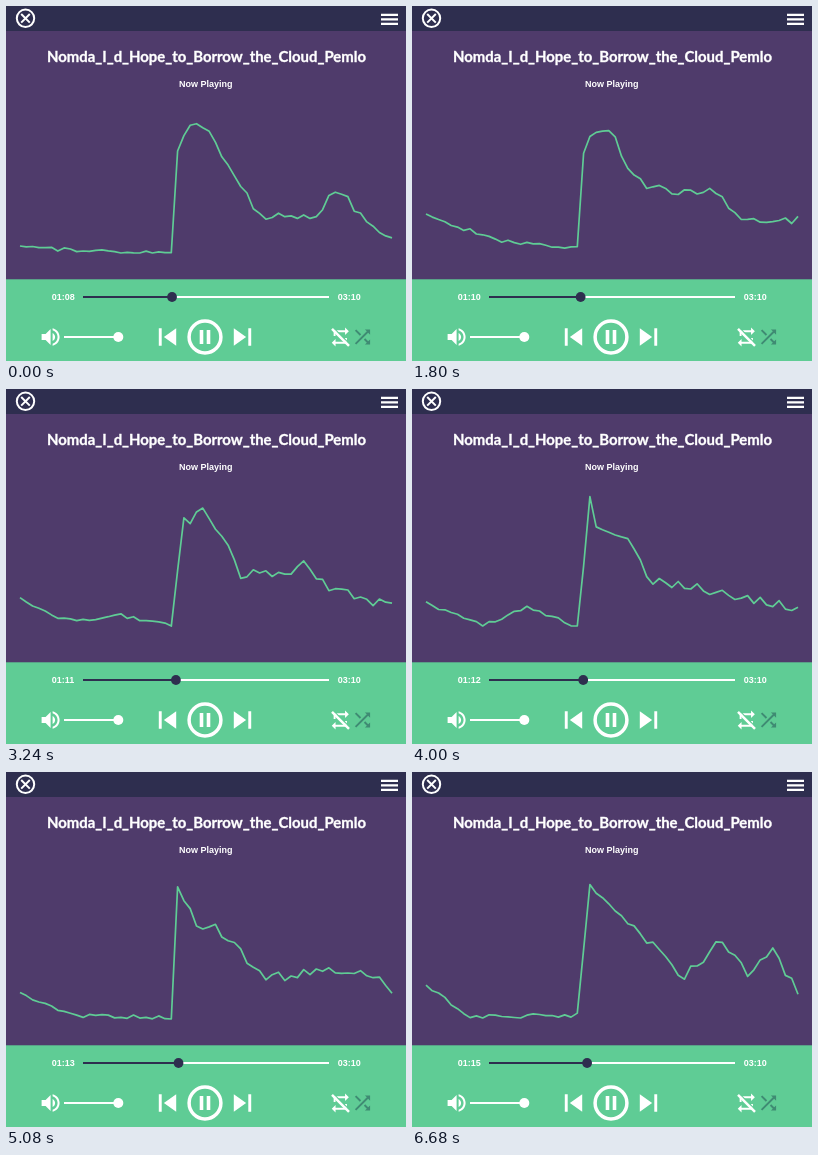
Recreate the animation shown at these times as an HTML page. Size 400 by 355 pixels, loop 6.72 s.

```html
<!DOCTYPE html>
<html lang="en">
<head>
<meta charset="utf-8">
<title>Music player</title>
<style>
  html, body { margin: 0; width: 100%; height: 100%; overflow: hidden; background: #4f3b6b; }
  svg { display: block; width: 400px; height: 355px; }
  text { fill: #fff; font: bold 9px "Liberation Sans", Arial, sans-serif; }
  .title { font: bold 14.9px Lato, Carlito, sans-serif; text-anchor: middle; stroke: #fff; stroke-width: .35; }
  .line { fill: none; stroke: #fff; stroke-width: 2; }
  .icon { fill: #fff; }
</style>
</head>
<body>
<svg viewBox="0 0 400 355">
  <rect width="400" height="355" fill="#4f3b6b"/>
  <rect width="400" height="25" fill="#2e2e4f"/>
  <rect y="273.3" width="400" height="81.7" fill="#5fcc95"/>

  <g class="line">
    <circle cx="19.5" cy="12.3" r="8.7"/>
    <path d="M15.2 8l8.6 8.6M23.8 8l-8.6 8.6"/>
    <path d="M375 8.9h17M375 13.4h17M375 17.9h17" stroke-width="2.3"/>
  </g>

  <text class="title" x="200.5" y="56">Nomda_I_d_Hope_to_Borrow_the_Cloud_Pemlo</text>
  <text x="173" y="81">Now Playing</text>
  <polyline id="wave" fill="none" stroke="#5fcc95" stroke-width="1.7" stroke-linejoin="round"/>

  <text id="elapsed" x="45.7" y="294"></text>
  <text x="331.7" y="294">03:10</text>
  <path class="line" d="M77 291H323"/>
  <path id="played" class="line" style="stroke:#2e2e4f"/>
  <circle id="knob" cy="291" r="4.9" fill="#2e2e4f"/>

  <path class="line" d="M58 331H112"/>
  <circle cx="112.3" cy="331" r="5" fill="#fff"/>

  <g class="icon">
    <path transform="translate(32.6 319)" d="M3 9v6h4l5 5V4L7 9H3zm13.5 3c0-1.77-1.02-3.29-2.5-4.03v8.05c1.48-.73 2.5-2.25 2.5-4.02zM14 3.23v2.06c2.89.86 5 3.54 5 6.71s-2.11 5.85-5 6.71v2.06c4.01-.91 7-4.49 7-8.77s-2.99-7.86-7-8.77z"/>
    <path transform="translate(144.1 313.6) scale(1.45)" d="M6 6h2v12H6zm3.5 6l8.5 6V6z"/>
    <path transform="translate(219.1 313.6) scale(1.45)" d="M6 18l8.5-6L6 6v12zM16 6v12h2V6h-2z"/>
    <circle class="line" cx="199" cy="331" r="15.9" style="stroke-width:3.5"/>
    <path d="M193.7 324h3.6v14h-3.6zM200.7 324h3.6v14h-3.6z"/>
    <path transform="translate(322.9 319.6) scale(.95)" d="M7 7h10v3l4-4-4-4v3H5v6h2V7zm10 10H7v-3l-4 4 4 4v-3h12v-6h-2v4z"/>
    <path class="line" d="M328 322.4l15.4 15.4" style="stroke:#5fcc95;stroke-width:1.3"/>
    <path class="line" d="M326 322.8l17 17" style="stroke-width:2.4"/>
    <path fill="#3f8b73" transform="translate(345.1 319.6) scale(.95)" d="M10.59 9.17L5.41 4 4 5.41l5.17 5.17 1.42-1.41zM14.5 4l2.04 2.04L4 18.59 5.41 20 17.96 7.46 20 9.5V4h-5.5zm.33 9.41l-1.41 1.41 3.13 3.13L14.5 20H20v-5.5l-2.04 2.04-3.13-3.13z"/>
  </g>
</svg>
<script>
const LOOP = 6720, TICK = 40, STEPS = 101;
const BANDS = 60, SPLIT = 25;      // bands from SPLIT on are the loud half
const TOP = 104, FLOOR = 247;
const START_SECOND = 68, TRACK_SECONDS = 190, SECOND_OFFSET = 330;
const $ = id => document.getElementById(id);
const lerp = (a, b, u) => a + (b - a) * u;

// Outlines of the spectrum through a few [band, y] points.
const poses = [
  { step: 0, points: [[0, 242], [24, 247], [25, 147], [27, 115], [29, 117], [38, 210], [47, 211], [50, 184], [59, 236]] },
  { step: 15, points: [[0, 213], [7, 221], [12, 240], [24, 247], [25, 111], [29, 141], [32, 175], [50, 221], [59, 214]] },
  { step: 39, points: [[0, 207], [5, 226], [24, 237], [26, 136], [29, 106], [35, 181], [43, 174], [45, 153], [50, 199], [59, 215]] },
  { step: 60, points: [[0, 214], [9, 236], [16, 219], [24, 238], [26, 109], [27, 142], [32, 150], [35, 189], [59, 218]] },
  { step: 76, points: [[0, 222], [8, 243], [24, 246], [25, 112], [28, 155], [31, 157], [39, 206], [54, 196], [59, 218]] },
  { step: 91, points: [[0, 233], [10, 245], [24, 246], [25, 115], [28, 163], [35, 188], [44, 196], [59, 236]] },
  { step: 100, points: [[0, 214], [7, 245], [24, 243], [26, 110], [36, 174], [41, 205], [47, 167], [51, 200], [55, 179], [59, 221]] },
];
poses.push({ ...poses[0], step: STEPS });

function noise(step, band) {
  const v = Math.sin(step * 12.9898 + band * 78.233) * 43758.5453;
  return (v - Math.floor(v)) * 2 - 1;
}

function outline(points, band) {
  const i = Math.max(1, points.findIndex(p => p[0] >= band));
  const [x0, y0] = points[i - 1], [x1, y1] = points[i];
  return lerp(y0, y1, (band - x0) / (x1 - x0));
}

function wavePoints(step) {
  const next = poses.findIndex(p => p.step > step);
  const a = poses[next - 1], b = poses[next];
  const u = (step - a.step) / (b.step - a.step);
  return Array.from({ length: BANDS }, (_, band) => {
    const base = lerp(outline(a.points, band), outline(b.points, band), u);
    const jitter = noise(step, band) * (band < SPLIT ? 2 : 5);
    const y = Math.max(TOP, Math.min(FLOOR, base + jitter));
    const x = 14 + band * 372 / (BANDS - 1);
    return x.toFixed(1) + "," + y.toFixed(1);
  }).join(" ");
}

function render(t) {
  const step = Math.floor((Math.floor(t / TICK) + 0.25) * TICK * STEPS / LOOP);
  $("wave").setAttribute("points", wavePoints(step));

  const second = START_SECOND + Math.floor((t + SECOND_OFFSET) / 1000);
  const x = 78 + second * 246 / TRACK_SECONDS;
  $("elapsed").textContent = "01:" + String(second - 60).padStart(2, "0");
  $("played").setAttribute("d", `M77 291H${x}`);
  $("knob").setAttribute("cx", x);
}

const begin = performance.now();
function frame() {
  render((performance.now() - begin) % LOOP);
  requestAnimationFrame(frame);
}
frame();
</script>
</body>
</html>
```
